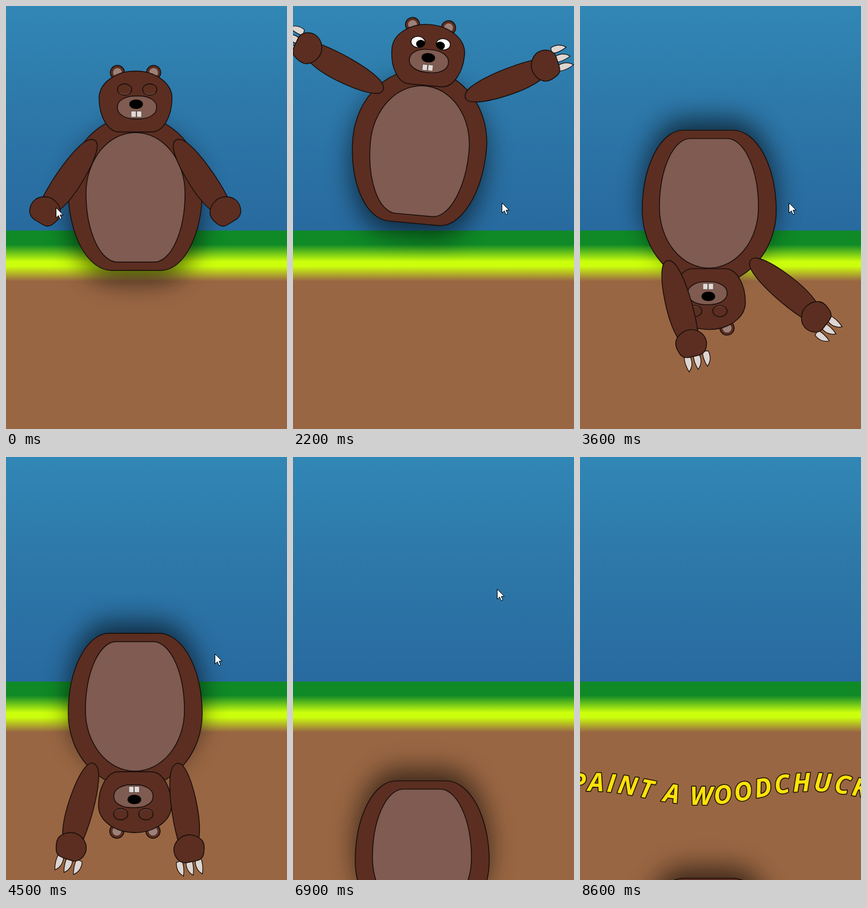
Write an HTML page that moves like this. It is 474x712 px and loops after 8700 ms.

```html
<!DOCTYPE html>
<html lang="en">
<head>
<meta charset="utf-8">
<title>Paint a Woodchuck</title>
<style>
  html, body { margin: 0; width: 100%; height: 100%; overflow: hidden; background: #996643; }
  svg { display: block; width: 100%; height: 100%; }
  .fur { fill: #5b2e21; stroke: #160d0a; stroke-width: 1.4; }
  .skin { fill: #7f5b51; stroke: #160d0a; stroke-width: 1.4; }
  .claw { fill: #ddd5d1; stroke: #160d0a; stroke-width: 1.2; }
  .tooth { fill: #e2dad7; stroke: #4a3a36; stroke-width: .7; }
  .title {
    font: italic 700 43px "Open Sans", sans-serif; letter-spacing: 4px;
    fill: #ffe10a; stroke: #1c1503; stroke-width: 3; stroke-linejoin: round;
    paint-order: stroke; text-anchor: middle;
  }
</style>
</head>
<body>
<svg viewBox="0 0 474 712" preserveAspectRatio="none">
  <defs>
    <linearGradient id="sky" x2="0" y2="1">
      <stop stop-color="#3187b5"/><stop offset=".45" stop-color="#2d78a9"/><stop offset="1" stop-color="#286a9f"/>
    </linearGradient>
    <linearGradient id="grass" x2="0" y2="1">
      <stop offset=".27" stop-color="#0f8a27"/><stop offset=".6" stop-color="#ccff0c"/>
      <stop offset=".69" stop-color="#ccff0c"/><stop offset=".98" stop-color="#996643"/>
    </linearGradient>
    <filter id="blur" x="-60%" y="-60%" width="220%" height="220%"><feGaussianBlur stdDeviation="22"/></filter>
    <path id="torso" d="M178 445A73 135 0 0 1 105 310A113 125 0 0 1 331 310A69 135 0 0 1 262 445Z"/>
    <clipPath id="eyeClip"><ellipse rx="12" ry="9.5"/></clipPath>
    <g id="ear"><circle class="fur" r="12"/><circle r="7.5" fill="#9c8179"/></g>
    <path id="claw" class="claw" d="M-5 -3C-13 4 -15 14 -12 22C-6 17 1 9 4 1Z"/>
    <g id="limb">
      <path class="fur" d="M62 322C80 287 110 246 131 230C142 222 154 222 154 236C152 262 118 320 92 342Z"/>
      <path class="fur" d="M40 346C40 331 50 321 65 321C80 321 92 334 92 349C91 358 84 363 78 368C70 373 65 370 57 365C50 360 41 358 40 346Z"/>
    </g>
    <path id="wave"/>
  </defs>

  <rect width="474" height="379" fill="url(#sky)"/>
  <rect y="378" width="474" height="87" fill="url(#grass)"/>
  <rect y="464" width="474" height="248" fill="#996643"/>

  <g id="bear">
    <use href="#torso" y="19" opacity=".6" filter="url(#blur)"/>
    <use href="#torso" class="fur"/>
    <path class="skin" d="M188 431A53 116 0 0 1 135 315A83.5 102 0 0 1 302 315A52 116 0 0 1 250 431Z"/>
    <use href="#ear" x="188" y="112"/>
    <use href="#ear" x="249" y="112"/>
    <path class="fur" d="M191 212A34 57 0 0 1 157 155A61.5 45.5 0 0 1 280 155A34 57 0 0 1 246 212Z"/>
    <g class="eye" transform="translate(200 140.5)"></g>
    <g class="eye" transform="translate(242.5 140.5) scale(-1 1)"></g>
    <rect class="skin" x="188" y="151.5" width="66" height="38.5" rx="29" ry="18"/>
    <path d="M208 165C208 155 231 155 231 165C231 176 208 176 208 165Z"/>
    <rect class="tooth" x="211" y="177" width="8.3" height="10"/>
    <rect class="tooth" x="220.5" y="177" width="8.3" height="10"/>
    <g class="arm"></g>
    <g transform="translate(436 0) scale(-1 1)"><g class="arm"></g></g>
  </g>

  <text id="title" class="title"><textPath href="#wave" startOffset="50%">PAINT A WOODCHUCK</textPath></text>
  <path id="cursor" d="M0 0V17L4 13.2L6.8 19.6L9.6 18.4L6.8 12.2H12Z" fill="#fff" stroke="#000"/>
</svg>
<script>
const LOOP = 8700;
const $ = id => document.getElementById(id);
const all = sel => [...document.querySelectorAll(sel)];
const smooth = u => u * u * (3 - 2 * u);
const linear = u => u;

// Each row: time in ms, then one or more values.
const tracks = {
  spin: [[1900, 0], [2250, 6], [2700, 64], [3200, 135], [3600, 180]],
  lift: [[1900, 0], [2300, -105], [2700, -140], [3150, -80], [3600, 0], [5500, 185], [6900, 336], [8600, 500], [8700, 510]],
  arms: [[1900, 0, 0], [2500, 157, 163], [2700, 157, 163], [3600, 96, 161]],
  eyes: [[1900, 0], [2150, 1], [3250, 1], [3550, 0]],
  leftClaws: [[150, 0], [550, 1]],
  rightClaws: [[1270, 0], [1650, 1]],
  cursor: [[0, 84, 339], [500, 84, 339], [1250, 366, 334], [1700, 366, 334], [2000, 352, 331], [4700, 352, 331],
    [5100, 344, 312], [5600, 344, 312], [6400, 344, 222], [7400, 344, 222], [8000, 490, 300]]
};

function sample(rows, t, ease = smooth) {
  const next = rows.findIndex(row => row[0] > t);
  if (next === 0) return rows[0].slice(1);
  if (next < 0) return rows[rows.length - 1].slice(1);
  const a = rows[next - 1], b = rows[next];
  const u = ease((t - a[0]) / (b[0] - a[0]));
  return a.slice(1).map((v, i) => v + (b[i + 1] - v) * u);
}

const eyes = all('.eye'), arms = all('.arm');
for (const eye of eyes) eye.innerHTML = `
  <g clip-path="url(#eyeClip)">
    <rect x="-12" y="-10" width="24" height="20" fill="#fff"/>
    <ellipse cx="5" cy="3" rx="8" ry="7"/>
    <g class="lid"><ellipse rx="13" ry="10.5" fill="#8d6a5f"/><ellipse cy="-2" rx="12.5" ry="10" fill="#5b2e21"/></g>
  </g>
  <ellipse rx="12" ry="9.5" fill="none" stroke="#160d0a" stroke-width="1.4"/>`;
for (const arm of arms) arm.innerHTML =
  [[40, 350], [53, 360], [66, 369]].map(([x, y]) =>
    `<g transform="translate(${x} ${y})"><use class="nail" href="#claw"/></g>`).join('') + '<use href="#limb"/>';
const lids = all('.lid');
const nails = arms.map(arm => [...arm.querySelectorAll('.nail')]);

function wavePath(amp) {
  const points = [];
  for (let x = -163; x <= 637; x += 5)
    points.push(`${x} ${(574 + amp * Math.cos((x - 205) * 2 * Math.PI / 370)).toFixed(2)}`);
  return 'M' + points.join('L');
}

function armAngles(t) {
  if (t < 3600) return sample(tracks.arms, t);
  const swing = Math.cos((t - 3600) / 1900 * 3 * Math.PI);
  return [129 - 33 * swing, 136 + 25 * swing];
}

function draw(t) {
  const [spin] = sample(tracks.spin, t, linear);
  const [lift] = sample(tracks.lift, t, linear);
  const drift = -11 * Math.sin(Math.PI * Math.min(1, Math.max(0, (t - 1900) / 1700)));
  $('bear').setAttribute('transform', `translate(${drift} ${lift}) rotate(${spin} 218 327)`);

  const angles = armAngles(t);
  const claws = [sample(tracks.leftClaws, t)[0], sample(tracks.rightClaws, t)[0]];
  arms.forEach((arm, i) => {
    arm.setAttribute('transform', `rotate(${angles[i]} 148.5 225.5)`);
    for (const nail of nails[i]) {
      nail.setAttribute('transform', `scale(${claws[i]})`);
      nail.style.display = claws[i] ? '' : 'none';
    }
  });

  const [open] = sample(tracks.eyes, t);
  for (const lid of lids) lid.setAttribute('transform', `translate(0 ${-21 * open})`);

  const [x, y] = sample(tracks.cursor, t);
  $('cursor').setAttribute('transform', `translate(${x + .5} ${y + .5})`);

  const titleOn = t >= 7150;
  $('title').style.display = titleOn ? '' : 'none';
  if (titleOn) $('wave').setAttribute('d', wavePath(12 + 118 * Math.cos((t - 8200) / 800 * Math.PI)));
}

const start = performance.now();
function tick() {
  draw((performance.now() - start) % LOOP);
  requestAnimationFrame(tick);
}
tick();
</script>
</body>
</html>
```
